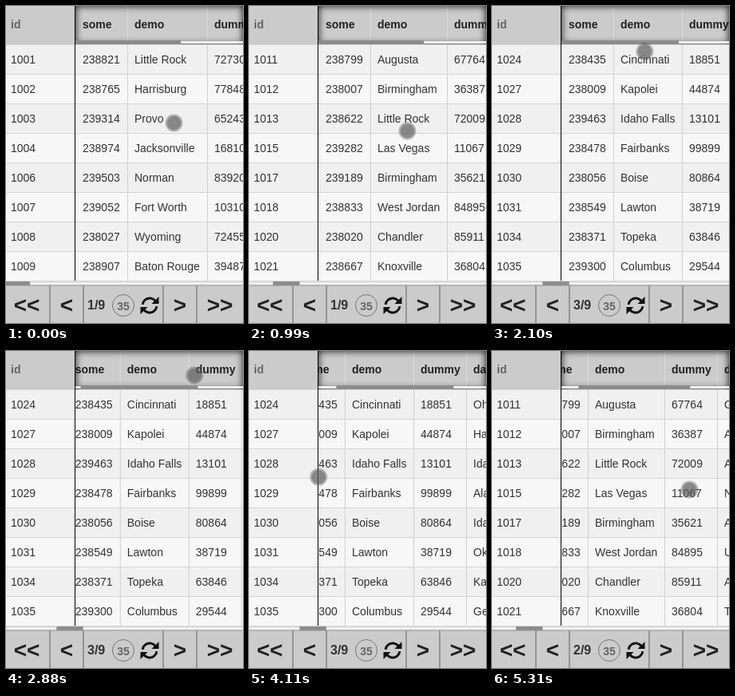
Recreate the animation shown at these times as an HTML page with a canvas. Size 297 px wide and 397 px high, loop 5340 ms.

```html
<!DOCTYPE html>
<html lang="en">
<head>
<meta charset="utf-8">
<title>Paged table</title>
<style>
html, body { margin: 0; width: 100%; height: 100%; overflow: hidden; background: #ccc; }
canvas { display: block; }
</style>
</head>
<body>
<canvas id="stage" width="297" height="397"></canvas>
<script>
const LOOP = 5340, W = 297, ID = 87, VIEW = W - ID, TOP = 48, ROW = 37, GAP = 300;
const ctx = document.getElementById('stage').getContext('2d');

const titles = ['some', 'demo', 'dummy', 'data'];
const pages = [
  { widths: [65, 100, 66, 103], text: `1001,238821,Little Rock,72730,Arkansas
1002,238765,Harrisburg,77848,Pennsylvania
1003,239314,Provo,65243,Utah
1004,238974,Jacksonville,16810,Florida
1006,239503,Norman,83920,Oklahoma
1007,239052,Fort Worth,10310,Texas
1008,238027,Wyoming,72455,Michigan
1009,238907,Baton Rouge,39487,Louisiana` },
  { widths: [65, 96, 66, 88], text: `1011,238799,Augusta,67764,Georgia
1012,238007,Birmingham,36387,Alabama
1013,238622,Little Rock,72009,Arkansas
1015,239282,Las Vegas,11067,Nevada
1017,239189,Birmingham,35621,Alabama
1018,238833,West Jordan,84895,Utah
1020,238020,Chandler,85911,Arizona
1021,238667,Knoxville,36804,Tennessee` },
  { widths: [65, 86, 66, 83], text: `1024,238435,Cincinnati,18851,Ohio
1027,238009,Kapolei,44874,Hawaii
1028,239463,Idaho Falls,13101,Idaho
1029,238478,Fairbanks,99899,Alaska
1030,238056,Boise,80864,Idaho
1031,238549,Lawton,38719,Oklahoma
1034,238371,Topeka,63846,Kansas
1035,239300,Columbus,29544,Georgia` }
];
for (const p of pages) {
  p.rows = p.text.split('\n').map(line => line.split(','));
  p.total = p.widths.reduce((a, b) => a + b);
}

const linear = u => u;
const out = u => 1 - (1 - u) ** 3;
const smooth = u => u * u * (3 - 2 * u);
const mix = (a, b, u) => a + (b - a) * u;

// Each key is [time, value, easing of the way to it].
const pagePath = [
  [210, 0], [620, 155 / GAP], [970, 1, out], [1140, 1], [1620, 1 + 148.5 / GAP], [1970, 2, out],
  [4290, 2], [4740, 2 - 172.5 / GAP], [5090, 1, out]
];
const headPath = [[620, 0], [970, 1, out], [1620, 1], [1970, 2, out], [4740, 2], [5090, 1, out]];
const scrollPath = [[2820, 0], [2880, 9], [3180, 78], [3330, 78], [3510, 37], [3570, 32]];
const cursorPath = [
  [210, [210, 146]], [620, [55, 152]], [660, [55, 152]], [990, [198, 156], smooth], [1140, [198, 156]],
  [1620, [50, 153]], [1680, [48, 153]], [1740, [48, 153]], [2160, [199, 51], smooth],
  [2640, [247, 31], out], [2820, [247, 31]], [2880, [236, 30]], [3180, [168, 29]],
  [3330, [168, 29]], [3510, [213, 28]], [3570, [216, 28]], [3720, [216, 28]],
  [4230, [66, 178], smooth], [4290, [72, 177]], [4590, [192, 173]], [4740, [252, 173]],
  [4950, [262, 174], out], [5310, [247, 173], smooth]
];

function at(path, t) {
  const i = path.findIndex(k => k[0] > t);
  if (i < 1) return path[i ? path.length - 1 : 0][1];
  const [t0, a] = path[i - 1], [t1, b, ease = linear] = path[i];
  const u = ease((t - t0) / (t1 - t0));
  return Array.isArray(a) ? a.map((v, j) => mix(v, b[j], u)) : mix(a, b, u);
}

function box(x, y, w, h, color) {
  ctx.fillStyle = color;
  ctx.fillRect(x, y, w, h);
}

function label(text, x, y, color = '#333', size = 14, weight = 'normal', align = 'left') {
  ctx.font = `${weight} ${size}px "Liberation Sans", Arial, sans-serif`;
  ctx.textAlign = align;
  ctx.fillStyle = color;
  ctx.fillText(text, x, y);
}

function clipped(x, y, w, h, draw) {
  ctx.save();
  ctx.beginPath();
  ctx.rect(x, y, w, h);
  ctx.clip();
  draw();
  ctx.restore();
}

function scrollbar(x, y, w, thumbX, thumbW) {
  box(x, y + 1, w, 3, '#eee');
  box(thumbX, y, thumbW, 5, '#8c8c8c');
}

// A page is 3px wider than the stage and hangs over its left edge.
function drawPage(page, x, scroll) {
  ctx.save();
  ctx.translate(x, 0);
  page.rows.forEach((row, i) => {
    const y = TOP + i * ROW;
    box(-3, y, GAP, ROW, i % 2 ? '#f7f7f7' : '#f0f0f0');
    box(-3, y, GAP, 1, '#d6d6d6');
    label(row[0], 6, y + 24);
  });
  clipped(ID, TOP, VIEW, 8 * ROW, () => {
    let left = ID - scroll;
    page.widths.forEach((w, c) => {
      page.rows.forEach((row, i) => label(row[c + 1], left + 9, TOP + i * ROW + 24));
      left += w;
      box(left, TOP, 1, 8 * ROW, '#d0d0d0');
    });
  });
  box(-3, TOP, 1, 8 * ROW, '#d0d0d0');
  box(ID - 1, TOP, 1, 8 * ROW, '#000');
  ctx.restore();
}

function insetShadow() {
  ctx.save();
  ctx.shadowColor = 'rgba(0,0,0,.9)';
  ctx.shadowBlur = 10;
  ctx.lineWidth = 20;
  ctx.strokeStyle = '#000';
  ctx.strokeRect(ID - 10, -10, VIEW + 20, TOP + 20);
  ctx.restore();
}

function drawHeader(head, current, scroll) {
  box(0, 0, W, TOP, '#cbcbcb');
  label('id', 6, 28, '#666', 14, 'bold');
  clipped(ID, 0, VIEW, TOP, () => {
    const a = pages[Math.floor(head)], b = pages[Math.ceil(head)];
    let left = ID - scroll;
    titles.forEach((title, c) => {
      label(title, left + 9, 28, '#222', 14, 'bold');
      left += mix(a.widths[c], b.widths[c], head % 1);
      box(left, 0, 1, 43, '#dadada');
    });
    insetShadow();
    const ratio = VIEW / pages[current].total;
    scrollbar(ID, 43, VIEW, ID + scroll * ratio, VIEW * ratio);
  });
  box(ID - 1, 0, 1, TOP, '#000');
}

function drawRefresh(x, y) {
  ctx.save();
  ctx.translate(x, y);
  ctx.strokeStyle = ctx.fillStyle = '#111';
  ctx.lineWidth = 3;
  for (let i = 0; i < 2; i++) {
    ctx.beginPath();
    ctx.arc(0, 0, 9, Math.PI * 1.04, Math.PI * 1.78);
    ctx.stroke();
    ctx.beginPath();
    ctx.moveTo(11.5, -11);
    ctx.lineTo(11.5, -2);
    ctx.lineTo(2.5, -2);
    ctx.fill();
    ctx.rotate(Math.PI);
  }
  ctx.restore();
}

function drawPager(pos, current) {
  box(0, 344, W, 6, '#d6d6d6');
  scrollbar(0, 345, W, GAP / 9 * pos - 3.3, GAP / 9);
  box(0, 350, W, 47, '#cbcbcb');
  box(0, 349.5, W, 1, '#999');
  for (const x of [54, 96, 196, 238]) {
    box(x, 350, 2, 47, '#959595');
  }
  [['<<', 26], ['<', 76], ['>', 218], ['>>', 268]].forEach(([text, x]) =>
    label(text, x, 384, '#222', 28, 'bold', 'center'));
  label(`${current + 1}/9`, 102, 380, '#333', 16, 'bold');
  ctx.beginPath();
  ctx.arc(147, 375, 13.5, 0, 7);
  ctx.strokeStyle = '#777';
  ctx.lineWidth = 1;
  ctx.stroke();
  label('35', 147, 381, '#666', 14, 'bold', 'center');
  drawRefresh(180, 375);
}

function drawCursor([x, y]) {
  ctx.beginPath();
  ctx.arc(x + .5, y + .5, 9, 0, 7);
  ctx.fillStyle = 'rgba(90,90,90,.7)';
  ctx.fill();
  ctx.beginPath();
  ctx.arc(x + .5, y + .5, 10, 0, 7);
  ctx.strokeStyle = 'rgba(90,90,90,.4)';
  ctx.lineWidth = 2;
  ctx.stroke();
}

function frame(now) {
  const t = now % LOOP;
  const pos = at(pagePath, t), scroll = at(scrollPath, t);
  const current = t < 1030 ? 0 : t < 2010 ? 1 : t < 5140 ? 2 : 1;
  box(0, 0, W, 397, '#f7f7f7');
  pages.forEach((page, i) => {
    if (Math.abs(i - pos) < 1) drawPage(page, (i - pos) * GAP, scroll);
  });
  drawHeader(at(headPath, t), current, scroll);
  drawPager(pos, current);
  drawCursor(at(cursorPath, t));
  requestAnimationFrame(frame);
}
frame(0);
</script>
</body>
</html>
```
